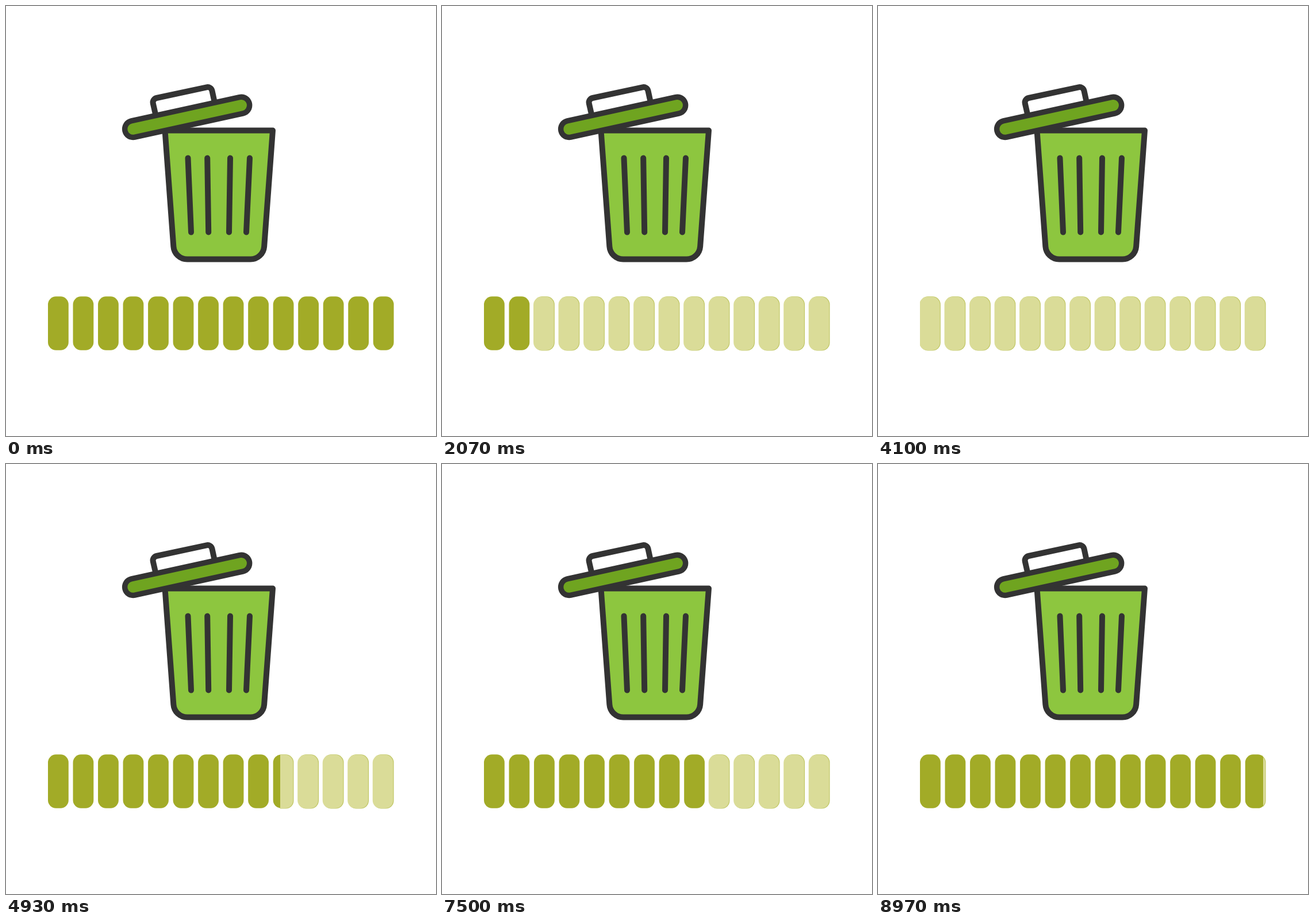
Animation, 748 px wide and 748 px high, one loop 9.01 s. Source, as an HTML page with a canvas:

```html
<!DOCTYPE html>
<html lang="en">
<head>
<meta charset="utf-8">
<title>Trash level</title>
<style>
html, body { margin: 0; width: 100%; height: 100%; overflow: hidden; background: #fff; }
canvas { display: block; width: 100vmin; height: 100vmin; }
</style>
</head>
<body>
<canvas id="stage" width="748" height="748"></canvas>
<script>
const ctx = document.getElementById('stage').getContext('2d');
const INK = '#333333', BODY = '#8dc63f', LID = '#6fa420';
const FULL = '#a2ab27', EMPTY = '#dadc98', RIM = '#bcc35a';
const LOOP = 9010, FPS = 30, CYCLE = 135;
const BARS = 14, LEFT = 73, PITCH = 43.52;

const linear = u => u;
const speedUp = u => u * u;
const smooth = u => u * u * (3 - 2 * u);

// Swings of the fill edge: start and end tick, target x, easing; it rests in between
const FULL_X = 682;
const SWINGS = [
  [0, 21, 379, smooth],
  [22, 38, 549, speedUp],
  [44, 62, 156, linear],
  [64, 92, 466, smooth],
  [94, 123, 73, smooth],
  [123, 135, FULL_X, smooth]
];

function level(tick) {
  let x = FULL_X;
  for (const [start, end, target, ease] of SWINGS) {
    const u = Math.min(1, Math.max(0, (tick - start) / (end - start)));
    x += (target - x) * ease(u);
    if (u < 1) break;
  }
  return x;
}

function line(points, width, color) {
  ctx.beginPath();
  points.forEach(([x, y]) => ctx.lineTo(x, y));
  ctx.lineWidth = width;
  ctx.strokeStyle = color;
  ctx.stroke();
}

function drawBin() {
  ctx.lineCap = ctx.lineJoin = 'round';

  ctx.beginPath();
  ctx.moveTo(276.5, 216.5);
  ctx.lineTo(464, 216.5);
  ctx.arcTo(447.5, 440.5, 370, 440.5, 24);
  ctx.arcTo(293, 440.5, 276.5, 216.5, 24);
  ctx.closePath();
  ctx.fillStyle = BODY;
  ctx.fill();
  ctx.lineWidth = 10;
  ctx.strokeStyle = INK;
  ctx.stroke();

  for (const [top, bottom] of [[316.5, 322], [350.2, 352.2], [390, 388], [424, 418]])
    line([[top, 264.5], [bottom, 393.5]], 10, INK);

  ctx.beginPath();
  ctx.moveTo(260, 188);
  ctx.arcTo(254, 161.7, 356.8, 139.6, 8);
  ctx.arcTo(356.8, 139.6, 362.5, 166, 8);
  ctx.lineTo(362.5, 166);
  ctx.stroke();

  const lid = [[221, 214], [409.3, 172.7]];
  line(lid, 38.3, INK);
  line(lid, 19.5, LID);
}

function pill(x, y, h, color) {
  ctx.beginPath();
  ctx.roundRect(x, y, 35.8, h, 14);
  ctx.fillStyle = color;
  ctx.fill();
}

function clipped(x, w, draw) {
  ctx.save();
  ctx.beginPath();
  ctx.rect(x, 490, w, 130);
  ctx.clip();
  for (let i = 0; i < BARS; i++) draw(LEFT + PITCH * i);
  ctx.restore();
}

function drawBars(edge) {
  clipped(0, edge, x => pill(x, 505.3, 93.5, FULL));
  clipped(edge, 748 - edge, x => {
    pill(x, 505.3, 94.2, RIM);
    pill(x - 1, 505.8, 93.2, EMPTY);
  });
}

function render(now) {
  // Small lead, since delays are rounded to 10 ms
  const tick = Math.floor((now % LOOP + 3.4) * FPS / 1000) % CYCLE;
  ctx.fillStyle = '#fff';
  ctx.fillRect(0, 0, 748, 748);
  drawBin();
  drawBars(Math.round(level(tick)));
}

const start = performance.now();
function loop() {
  render(performance.now() - start);
  requestAnimationFrame(loop);
}
loop();
</script>
</body>
</html>
```
